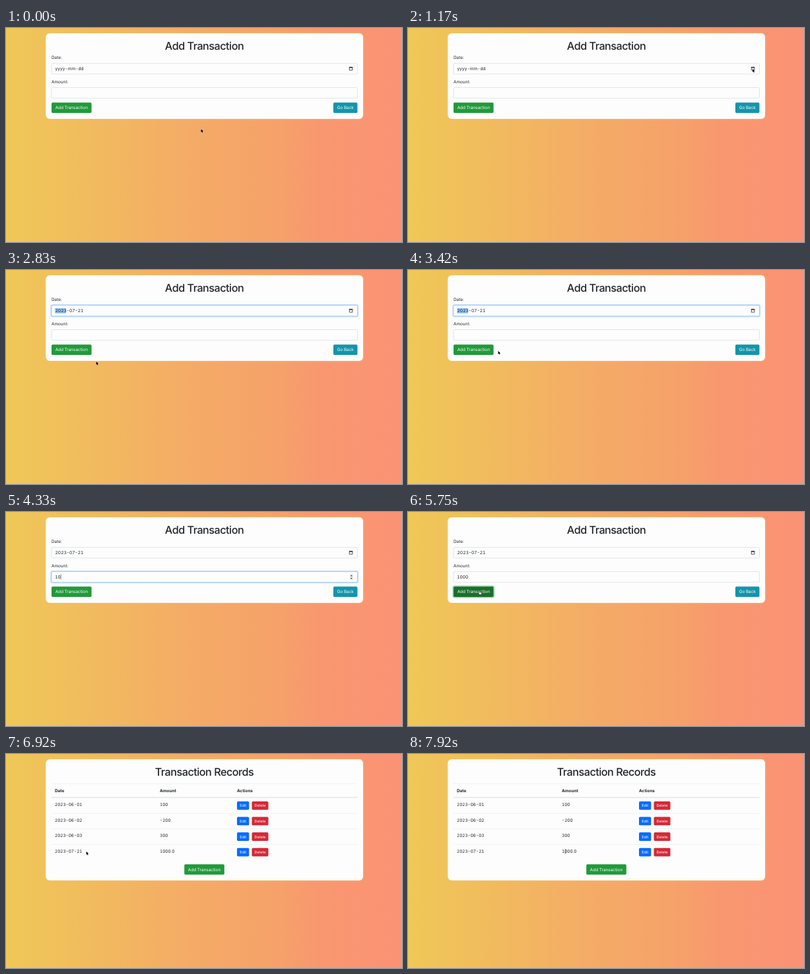
These frames come from a looping animation (600x325 px, 8 s). An HTML page:

```html
<!DOCTYPE html>
<html lang="en">
<head>
<meta charset="utf-8">
<title>Add Transaction</title>
<style>
  html, body { margin: 0; width: 100%; height: 100%; overflow: hidden; }
  svg { display: block; width: 100%; height: 100%; }
  text {
    font-family: Inter, "Liberation Sans", sans-serif;
    font-feature-settings: "tnum";
    text-rendering: geometricPrecision;
    white-space: pre;
  }
  .title { letter-spacing: -.5px; }
</style>
</head>
<body>
<svg id="stage" viewBox="0 0 600 325" preserveAspectRatio="none"></svg>
<script>
const LOOP = 8000;
const INK = '#212529', GREEN = '#219a3a', TEAL = '#1495ab', BLUE = '#086cfd', RED = '#d42a38';

// Moments of the story, in ms
const OPEN = 1250, PICK = 2750, FOCUS = 3750, PRESS = 5580, SAVED = 5830;
const KEYS = [4090, 4250, 4420, 4600];
const CURSOR_GONE = KEYS[0], CURSOR_BACK = 4760;

// Pointer path: time, x, y
const PATH = [
  [0, 295.5, 153.5], [130, 295.5, 153.5], [850, 505, 82], [1080, 522, 62], [1350, 522, 62],
  [1920, 195.5, 120.5], [2450, 137, 139], [3100, 136.5, 139], [3330, 137, 129],
  [3650, 135, 98], [4760, 135, 98], [5000, 121, 114], [5250, 108.5, 120.5],
  [5900, 108.5, 120.5], [6400, 110, 146], [6850, 118, 148], [7500, 228, 148],
  [7750, 238.5, 148], [8000, 238.5, 148]
];

const text = (x, cy, str, o = {}) => {
  const { size = 6.4, weight = 400, fill = INK, anchor = 'start', attrs = '' } = o;
  return `<text x="${x}" y="${cy + size * .36}" font-size="${size}" font-weight="${weight}"
    fill="${fill}" text-anchor="${anchor}" ${attrs}>${str}</text>`;
};
const box = (x, y, w, h, fill, r = 0, attrs = '') =>
  `<rect x="${x}" y="${y}" width="${w}" height="${h}" rx="${r}" fill="${fill}" ${attrs}/>`;
const line = (y, color, width) =>
  `<path d="M69 ${y}H532.5" stroke="${color}" stroke-width="${width}"/>`;
const button = (x, y, w, h, fill, label, size = 6.4, id = '') =>
  box(x, y, w, h, fill, 1.7, id && `id="${id}"`) +
  text(x + w / 2, y + h / 2, label, { size, fill: '#fff', anchor: 'middle' });
const card = (height, title) =>
  box(60.3, 8, 480.7, height, '#f2c95c', 6, 'filter="url(#glow)"') +
  box(60.3, 8, 480.7, height, '#fdfdfd', 6) +
  text(300.5, 27, title, { size: 16.2, weight: 500, anchor: 'middle', attrs: 'class="title"' });
const field = (y, id) =>
  box(68.2, y - .8, 465.1, 17.8, 'none', 2.4, `id="${id}Ring" stroke="#bfdcfd" stroke-width="1.6"`) +
  box(69, y, 463.5, 16.2, '#fdfdfd', 1.7, `id="${id}Box" stroke-width=".6"`);

function calendar() {
  const col = i => 79.6 + i * 11.83;
  const cell = (x, y, str, fill = '#111', weight = 500) =>
    text(x, y, str, { size: 5.2, weight, fill, anchor: 'middle' });
  let out = box(69, 70, 92, 119, '#000', 1, 'opacity=".4" filter="url(#drop)"') +
    box(69, 70, 92, 119, '#fff', 1, 'stroke="#bbb" stroke-width=".4"') +
    text(73.5, 79.5, 'July 2023', { size: 5.2, weight: 700, fill: '#111' }) +
    '<path d="M97.7 78.7h3.4l-1.7 2z" fill="#111"/>' +
    '<path d="M137 83V76.6m-3 3l3-3 3 3M150.6 76.4v6.4m-3-3l3 3 3-3" fill="none" stroke="#333" stroke-width=".75"/>';
  [...'SMTWTFS'].forEach((day, i) => out += cell(col(i), 95.2, day));
  for (let i = 0; i < 42; i++) {
    const day = i < 6 ? 25 + i : i < 37 ? i - 5 : i - 36;
    const inMonth = i >= 6 && i < 37, chosen = inMonth && day === 21;
    const x = col(i % 7), y = 107.2 + Math.floor(i / 7) * 11.87;
    if (chosen) out += box(x - 6.2, y - 5.9, 12, 11.8, BLUE, .8);
    out += cell(x, y, day, chosen ? '#fff' : inMonth ? '#111' : '#777', chosen ? 700 : inMonth ? 500 : 400);
  }
  return out + cell(84, 179.8, 'Clear', '#1769e0', 400) + cell(145, 179.8, 'Today', '#1769e0', 400);
}

function formScreen() {
  return card(130, 'Add Transaction') +
    text(69, 45, 'Date:') + field(53.7, 'date') +
    box(74.3, 58, 16.6, 7.8, '#94c3f8', 0, 'id="yearMark"') +
    text(74.6, 62, '', { size: 6.6, attrs: 'id="dateText"' }) +
    '<path d="M520.3 59.8h4.6v4.3h-4.6z" fill="none" stroke="#111" stroke-width=".7"/>' +
    '<path d="M520 60.1h5.2M521.3 58.9v1M523.9 58.9v1" stroke="#111" stroke-width=".9"/>' +
    text(69, 82, 'Amount:') + field(90.5, 'amount') +
    text(74.3, 98.6, '', { size: 6.5, attrs: 'id="amountText"' }) +
    box(0, 94.6, .5, 8, '#111', 0, 'id="caret"') +
    '<g id="spinner">' + box(520.6, 93.9, 5.6, 9.6, '#ececec', 1) +
    '<path d="M522 97.4l1.4-1.9 1.4 1.9zM522 100l1.4 1.9 1.4-1.9z" fill="#333"/></g>' +
    box(68.2, 112.4, 62.2, 17.4, 'none', 2.4, 'id="pressRing" stroke="#a5d8af" stroke-width="1.6"') +
    button(69, 113.2, 60.6, 15.8, GREEN, 'Add Transaction', 6.4, 'addButton') +
    button(496, 113.2, 36.5, 15.8, TEAL, 'Go Back') +
    `<g id="calendar">${calendar()}</g>`;
}

function recordsScreen() {
  let out = card(184, 'Transaction Records') + line(45, '#dee2e6', .5) + line(66, '#d5d9dd', 1);
  [[74, 'Date'], [233, 'Amount'], [350, 'Actions']].forEach(([x, head]) =>
    out += text(x, 55.6, head, { weight: 700 }));
  [['2023-06-01', '100'], ['2023-06-02', '-200'], ['2023-06-03', '300'], ['2023-07-21', '1000.0']]
    .forEach(([date, amount], i) => {
      const y = 76.8 + i * 23.55;
      out += text(74, y, date) + text(233, y, amount) +
        button(350, y - 4.8, 18.3, 12.8, BLUE, 'Edit', 5.6) +
        button(372.5, y - 4.8, 25, 12.8, RED, 'Delete', 5.6);
      if (i < 3) out += line(y + 13.4, '#dee2e6', .5);
    });
  return out + button(270.2, 167.4, 60.6, 15.8, GREEN, 'Add Transaction');
}

const stage = document.getElementById('stage');
stage.innerHTML = `
  <defs>
    <linearGradient id="sunset">
      <stop offset="0" stop-color="#efc857"/><stop offset=".45" stop-color="#f4ac66"/>
      <stop offset=".7" stop-color="#f6a06a"/><stop offset=".78" stop-color="#f8986f"/>
      <stop offset="1" stop-color="#fb9275"/>
    </linearGradient>
    <filter id="glow"><feGaussianBlur stdDeviation="1.8"/></filter>
    <filter id="drop" x="-20%" y="-20%" width="140%" height="140%">
      <feOffset dy="1.5"/><feGaussianBlur stdDeviation="2"/></filter>
  </defs>
  ${box(0, 0, 600, 325, 'url(#sunset)')}
  <g id="form">${formScreen()}</g>
  <g id="records">${recordsScreen()}</g>
  <g id="cursor">
    <path id="arrow" d="M0 0V5L1.2 3.9 2 5.7 2.9 5.3 2.1 3.6H3.7Z" fill="#000" stroke="#fff" stroke-width=".5" paint-order="stroke"/>
    <path id="beam" d="M-1.1-3Q0-3 0-2.2Q0-3 1.1-3M0-2.2V2.2M-1.1 3Q0 3 0 2.2Q0 3 1.1 3" fill="none" stroke="#333" stroke-width=".6"/>
    <path id="hand" d="M-.5-.8Q0-1.4.5-.8V1.3L2.6 1.8Q3.2 2 3 3L2.5 5H-.2L-1.8 2.7Q-1.6 1.9-.5 2.6Z" fill="#fff" stroke="#111" stroke-width=".5"/>
  </g>`;

const el = {};
stage.querySelectorAll('[id]').forEach(node => el[node.id] = node);
const show = (id, on) => el[id].style.display = on ? '' : 'none';
const within = (p, x0, y0, x1, y1) => p.x >= x0 && p.x <= x1 && p.y >= y0 && p.y <= y1;

function pointerAt(t) {
  const i = Math.max(1, PATH.findIndex(key => key[0] > t));
  const [t0, x0, y0] = PATH[i - 1], [t1, x1, y1] = PATH[i];
  const u = (t - t0) / (t1 - t0), e = u * u * (3 - 2 * u);
  return { x: x0 + (x1 - x0) * e, y: y0 + (y1 - y0) * e };
}

function cursorKind(p, saved) {
  if (saved) {
    const row = Math.abs((p.y - 76.8 + 11.8) % 23.55 - 11.8) < 5;
    const overText = within(p, 72, 70, 113, 153) || within(p, 231, 70, 256, 153);
    return row && overText ? 'beam' : 'arrow';
  }
  if (within(p, 69, 113, 129.6, 129)) return 'hand';
  return within(p, 69, 90.5, 532, 106.7) ? 'beam' : 'arrow';
}

function draw(t) {
  const saved = t >= SAVED;
  const dateFocus = t >= OPEN && t < FOCUS, amountFocus = t >= FOCUS && t < PRESS;
  const p = pointerAt(t), kind = cursorKind(p, saved);

  show('form', !saved);
  show('records', saved);
  show('calendar', t >= OPEN && t < PICK);
  show('yearMark', dateFocus);
  show('spinner', amountFocus);
  show('pressRing', t >= PRESS);
  [['date', dateFocus], ['amount', amountFocus]].forEach(([id, focus]) => {
    show(id + 'Ring', focus);
    el[id + 'Box'].setAttribute('stroke', focus ? '#80b9f8' : '#ced4da');
  });

  el.dateText.textContent = t < PICK ? 'yyyy-mm-dd' : '2023-07-21';
  const typed = KEYS.filter(key => t >= key);
  el.amountText.textContent = '1000'.slice(0, typed.length);
  const sinceKey = t - (typed.length ? typed[typed.length - 1] : FOCUS);
  show('caret', amountFocus && sinceKey % 1000 < 500);
  if (!saved) el.caret.setAttribute('x', 74.4 + (typed.length ? el.amountText.getComputedTextLength() : 0));

  el.addButton.setAttribute('fill', t >= PRESS ? '#1a6f2c' : kind === 'hand' ? '#1d8033' : GREEN);
  show('cursor', t < CURSOR_GONE || t >= CURSOR_BACK);
  el.cursor.setAttribute('transform', `translate(${p.x} ${p.y})`);
  ['arrow', 'beam', 'hand'].forEach(id => show(id, id === kind));
}

const start = performance.now();
(function tick() {
  draw((performance.now() - start) % LOOP);
  requestAnimationFrame(tick);
})();
</script>
</body>
</html>
```
